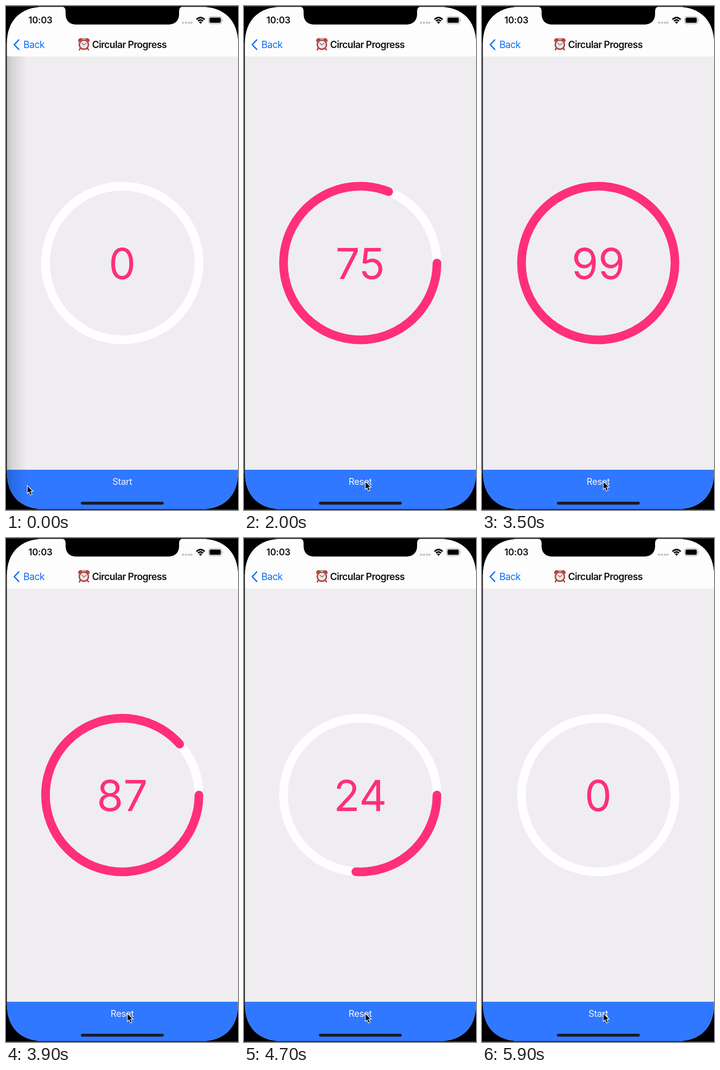
Recreate the animation shown at these times as an HTML page. Size 508x1102 px, loop 6900 ms.

```html
<!DOCTYPE html>
<html lang="en">
<head>
<meta charset="utf-8">
<title>Circular Progress</title>
<style>
  html, body { margin: 0; width: 100%; height: 100%; overflow: hidden; background: #000; }
  svg { display: block; width: 100vw; height: 100vh; }
  text { font-family: Inter, Roboto, sans-serif; }
  .bold { font-weight: 600; fill: #141316; }
  #count { font-size: 94px; fill: #ff2f78; text-anchor: middle; }
  #label { font-size: 20px; letter-spacing: -.02em; fill: #f3f5ff; text-anchor: middle; }
  .ring { fill: none; stroke-width: 19; }
  #shade { animation: fade 6.9s linear infinite; }
  @keyframes fade { 0%, 1.4% { opacity: 1; } 7%, 100% { opacity: 0; } }
</style>
</head>
<body>
<svg viewBox="0 0 508 1102" preserveAspectRatio="none">
  <defs>
    <clipPath id="screen">
      <path d="M2 82C2 32 32 2 82 2H428C478 2 508 32 508 82V1020C508 1070 478 1100 428 1100H82C32 1100 2 1070 2 1020Z"/>
    </clipPath>
    <linearGradient id="edge">
      <stop offset="0" stop-color="#000" stop-opacity=".19"/>
      <stop offset=".35" stop-color="#000" stop-opacity=".09"/>
      <stop offset="1" stop-color="#000" stop-opacity="0"/>
    </linearGradient>
  </defs>

  <rect width="508" height="1102"/>
  <path d="M.7 80V1022M0 .8H508M0 1101.2H508" stroke="#3b3b3e" stroke-width="1.4"/>
  <g clip-path="url(#screen)">
    <rect width="508" height="1102" fill="#efedf0"/>
    <rect width="508" height="110.5" fill="#fefdfe"/>
    <rect y="1014" width="508" height="88" fill="#2f78ff"/>
    <rect id="shade" y="110" width="46" height="992" fill="url(#edge)"/>
  </g>
  <path d="M122 1Q130.500 2 130.500 11V17C130.500 32 139 40.500 154 40.500H355C370 40.500 379 32 379 17V11Q379 2 388 1Z"/>

  <text class="bold" x="49" y="38" font-size="20" letter-spacing="-.3">10:03</text>
  <g fill="#c5c4c7">
    <circle cx="387.500" cy="36.500" r="2.500"/><circle cx="394" cy="36.500" r="2.500"/>
    <circle cx="400.500" cy="36.500" r="2.500"/><circle cx="406" cy="36.500" r="2.500"/>
  </g>
  <g fill="none" stroke="#0b0b0c" stroke-width="3.200">
    <path d="M417 29.500Q426 21 435 29.500M420.500 33Q426 28 431.500 33"/>
    <path d="M426 38.500L423 35.500Q426 33 429 35.500Z" fill="#0b0b0c" stroke-width="1"/>
  </g>
  <rect x="443.700" y="23.200" width="28.600" height="15.600" rx="4.700" fill="none" stroke="#a3a2a5" stroke-width="1.300"/>
  <rect x="445.700" y="25.200" width="24.600" height="11.600" rx="3"/>
  <path d="M474 28.500Q476.500 31 474 33.500Z" fill="#a3a2a5"/>

  <path d="M28 74L18 84.500L28 95" fill="none" stroke="#0a6ff5" stroke-width="2.700" stroke-linecap="round" stroke-linejoin="round"/>
  <text x="38" y="91.500" font-size="21" letter-spacing="-.7" fill="#0a6ff5">Back</text>

  <g>
    <path d="M163 92L160.500 96M178 92L180.500 96" stroke="#8f3030" stroke-width="2.500" stroke-linecap="round"/>
    <path d="M159 79A5.500 5.500 0 0 1 168 72.500ZM182 79A5.500 5.500 0 0 0 173 72.500Z" fill="#b5443f"/>
    <path d="M167 72Q170.500 69 174 72" fill="none" stroke="#777" stroke-width="1.500"/>
    <circle cx="170.500" cy="84.500" r="10" fill="#e9e7e5" stroke="#b8413f" stroke-width="3"/>
    <path d="M165.500 81L170.500 85L176 81.500" fill="none" stroke="#555" stroke-width="1.200"/>
  </g>
  <text class="bold" x="188.500" y="91.500" font-size="21" letter-spacing="-.75">Circular Progress</text>

  <circle class="ring" cx="254.500" cy="562" r="168" stroke="#fffdff"/>
  <circle class="ring" id="arc" cx="254.500" cy="562" r="168" stroke="#ff2f78" stroke-linecap="round" pathLength="1"/>
  <text id="count" x="254.500" y="596.500">0</text>
  <text id="label" x="254.500" y="1046.500">Start</text>
  <rect x="164" y="1084" width="181.500" height="6.200" rx="3.100" fill="#181b24"/>
  <path id="cursor" d="M0 0V17.500L4 14L7 21L10.500 19.500L7.500 12.700H13Z" fill="#000" stroke="#fff" stroke-width="1.300"/>
</svg>
<script>
  const LOOP = 6900, STEP = 100, RUN = 2000;
  const FILL_START = 616, FILL_SHOWN = 1400, DRAIN_START = 3420;
  const [arc, count, label, cursor] = ['arc', 'count', 'label', 'cursor'].map(id => document.getElementById(id));

  const clamp = x => Math.min(1, Math.max(0, x));
  const ease = x => x < .5 ? 2 * x * x : 1 - 2 * (1 - x) ** 2;
  const ramp = (t, start, length) => ease(clamp((t - start) / length));

  function progress(t, lag) {
    if (t < FILL_SHOWN) return 0;
    if (t < DRAIN_START) return ramp(t - lag, FILL_START, RUN);
    return 1 - ramp(t, DRAIN_START, RUN);
  }

  function draw(now) {
    const t = Math.floor(now % LOOP / STEP) * STEP;
    const p = progress(t, 0);
    // The number trails the arc while filling and leads it while draining.
    const shown = t < DRAIN_START ? progress(t, 85) : progress(t + 20, 0);
    arc.style.visibility = p > 0 ? 'visible' : 'hidden';
    arc.setAttribute('stroke-dasharray', p < 1 ? `${p} 2` : 'none');
    count.textContent = Math.floor(shown * 100);
    label.textContent = p > 0 ? 'Reset' : 'Start';
    const m = ramp(t, 50, 600);
    cursor.setAttribute('transform', `translate(${46.5 + 219 * m} ${1048.5 - 9 * m})`);
    requestAnimationFrame(tick);
  }

  const began = performance.now();
  const tick = () => draw(performance.now() - began);
  tick();
</script>
</body>
</html>
```
